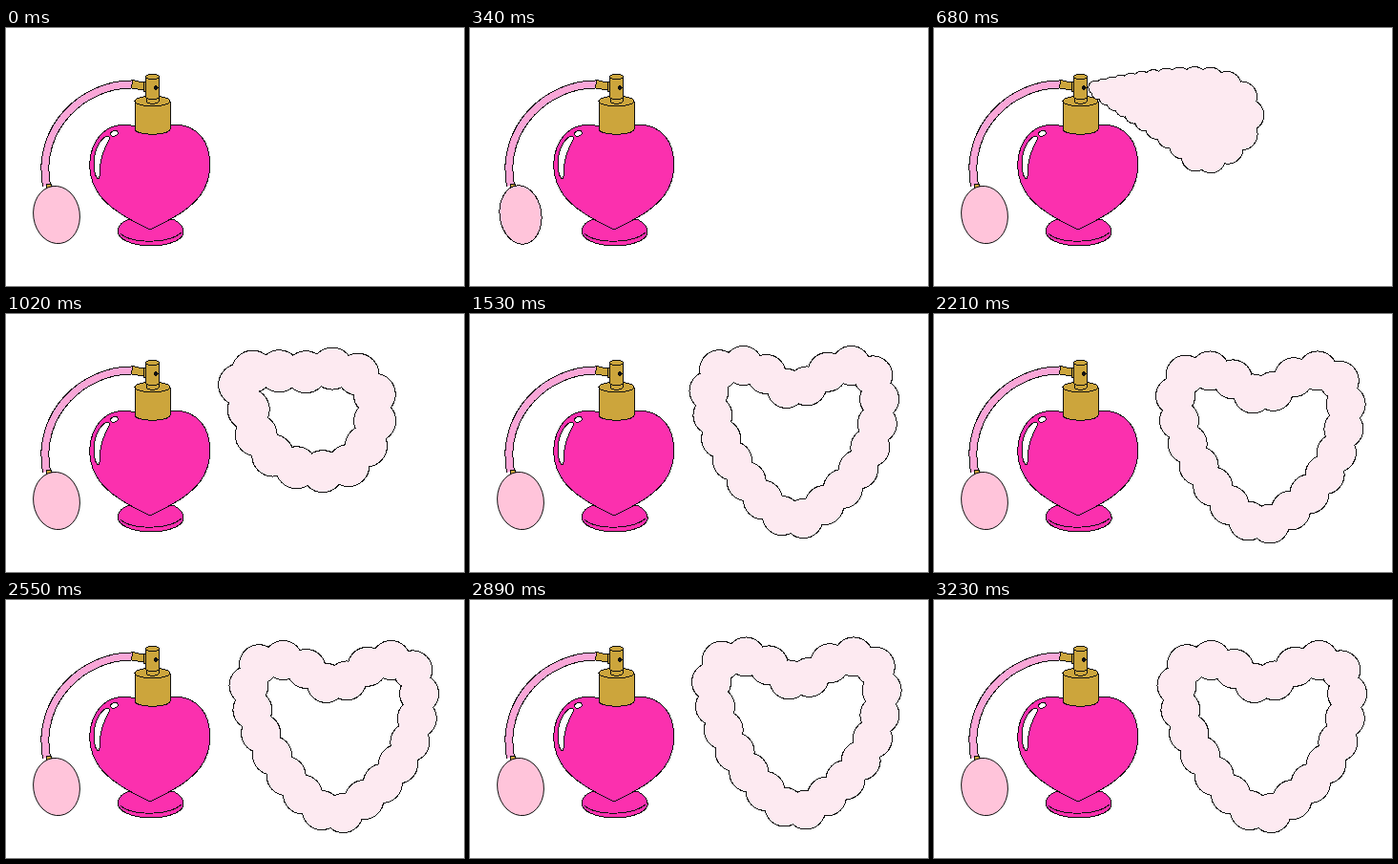
Recreate the animation shown at these times as an HTML page. Size 480 by 270 pixels, loop 3.4 s.

```html
<!DOCTYPE html>
<html lang="en">
<head>
<meta charset="utf-8">
<title>Perfume puff</title>
<style>
  html, body { margin: 0; width: 100%; height: 100%; overflow: hidden; background: #fff; }
  svg { display: block; width: 100vw; height: 100vh; }
  svg * { vector-effect: non-scaling-stroke; }
  .gold { fill: #cca53c; }
  .hot { fill: #fb30ae; }
</style>
</head>
<body>
<svg viewBox="0 0 480 270" stroke="#111" stroke-linejoin="round" shape-rendering="crispEdges">
  <g fill="none">
    <path d="M133 59C82 58 31 104 42.500 165" stroke-width="9"/>
    <path d="M133 59C82 58 31 104 42.500 165" stroke="#f9a6d7" stroke-width="7"/>
  </g>
  <path class="gold" d="M42 164L47 163L49 168L43 168Z"/>
  <ellipse id="bulb" cx="53" cy="195.5" rx="24.3" ry="30.2" fill="#ffc4da"/>

  <path class="hot" d="M129 200C118 204 116 211 118 216C122 224 138 228 152 228C168 228 184 223 186 215C187 209 183 204 175 200Z"/>
  <path fill="none" d="M120 215C132 226 170 226 184 214"/>
  <path class="hot" d="M135 103C122 99 108 102 99 112C86 126 84 152 95 170C104 187 128 200 151 211C174 200 199 187 208 168C217 150 215 126 205 114C196 103 184 100 172 102Z"/>
  <path fill="#fff" d="M106 113C97 117 92 130 92 143C92 150 94 157 97 158C99 156 98 148 99 142C100 132 104 125 108 117C109 114 108 113 106 113Z"/>
  <ellipse cx="113.3" cy="110.3" rx="4" ry="2.8" fill="#fff" transform="rotate(-20 113.3 110.3)"/>

  <g class="gold">
    <path d="M135 76.500V106C137 113 170 113 172 106V76.500Z"/>
    <ellipse cx="153.500" cy="76.500" rx="18.500" ry="5.300"/>
    <path d="M132.500 54.500L144 57V65L131.500 63Z"/>
    <path d="M144 56H147V66H144Z"/>
    <path d="M147 72V77C149 80 158 80 160 77V72Z"/>
    <path d="M146.500 51V72.500C149 75.500 158 75.500 160.500 72.500V51Z"/>
    <ellipse cx="153.500" cy="51" rx="7" ry="2.500"/>
    <circle cx="157.300" cy="62.500" r="1.800" fill="#111"/>
  </g>
  <g id="cloud">
    <path id="rim" stroke-width="2"/>
    <path id="fluff" fill="#fdeaf1" stroke="none"/>
  </g>
</svg>
<script>
const el = id => document.getElementById(id);
const nozzle = { x: 160, y: 62 };

// Strings round puffs along a curve; they swell by `grow` per pixel away from the nozzle.
function puffs(curve, size, grow = 0) {
  const path = document.createElementNS('http://www.w3.org/2000/svg', 'path');
  path.setAttribute('d', curve);
  const length = path.getTotalLength();
  let d = '';
  for (let s = size * .65, r; s < length; s += r * 1.3) {
    const { x, y } = path.getPointAtLength(s);
    r = size + grow * Math.hypot(x - nozzle.x, y - nozzle.y);
    d += `M${x - r} ${y}a${r} ${r} 0 0 1 ${2 * r} 0a${r} ${r} 0 0 1 ${-2 * r} 0Z`;
  }
  return d;
}

const sprayCurve = 'M165 63C195 57 235 52 275 54C310 55 330 72 329 92C326 118 305 130 280 141C255 115 225 100 165 63Z';
const ringCurve = 'M246 66C265 50 300 68 338 57C375 57 388 75 388 97C388 125 372 162 342 164C300 169 262 145 258 112C256 95 240 85 246 66Z';
const heartCurve = 'M346 91C360 86 372 66 402 63C428 62 434 84 433 103C432 152 402 200 344 228C300 205 265 150 256 105C250 70 262 63 290 63C315 64 325 86 346 91Z';

const spray = sprayCurve + puffs(sprayCurve, 6, .06);
const ring = puffs(ringCurve, 21.5);
const blob = ringCurve + ring;
const heart = puffs(heartCurve, 20);

function cloudAt(step) {
  if (step < 3) return [''];
  if (step === 3) return [spray, 'translate(160 62) rotate(-10) scale(.69) translate(-160 -62)'];
  if (step === 4) return [spray];
  if (step === 5) return [blob, 'translate(192 27) scale(.872 .92) translate(-221 -34)'];
  if (step === 6) return [ring];
  if (step < 10) return [heart, `translate(-4 ${-9 + 35 * .015 * (9 - step)}) scale(1 ${1 - .015 * (9 - step)})`];
  // The finished heart hops up and eases back every four steps.
  const hop = (3 - step % 4) ** 2 * 8 / 9;
  return [heart, `translate(${-hop * .4} ${-hop})`];
}

function draw(now) {
  const step = Math.floor(now % 3400 / 170);
  const [d, move = ''] = cloudAt(step);
  el('rim').setAttribute('d', d);
  el('fluff').setAttribute('d', d);
  el('cloud').setAttribute('transform', move);

  const squeeze = .1 * Math.sin(Math.PI * Math.min(step, 4) / 4);
  el('bulb').setAttribute('transform',
    `translate(53 195.5) rotate(-8) scale(${1 - squeeze} ${1 + squeeze * .2}) translate(-53 -195.5)`);
}

const start = performance.now();
function tick() {
  draw(performance.now() - start);
  requestAnimationFrame(tick);
}
tick();
</script>
</body>
</html>
```
